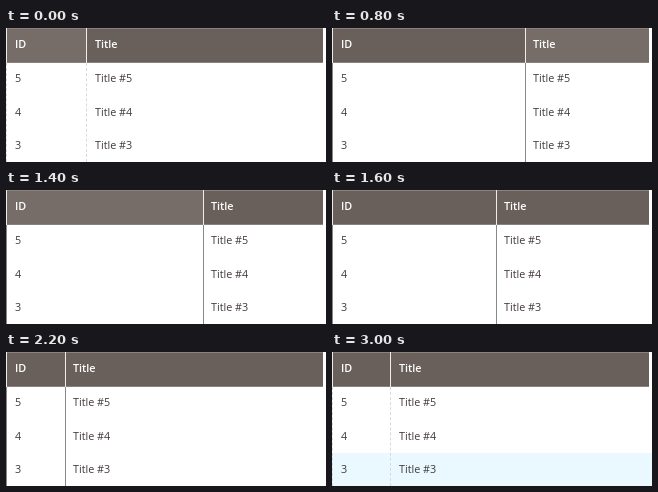
An HTML page that plays this animation: 320x134 px, repeating every 3.1 s.

```html
<!DOCTYPE html>
<html lang="en">
<head>
<meta charset="utf-8">
<title>Resizable column</title>
<style>
html, body { margin: 0; width: 100%; height: 100%; overflow: hidden; background: #fff; }
#grid {
  --x: 80px;
  --line: var(--x);
  position: relative; width: 320px; height: 134px; overflow: hidden;
  font: 10.8px/31px "Open Sans", sans-serif; color: #41393a;
}
#grid.drag { --line: calc(var(--x) + 1px); }
#grid div { position: absolute; white-space: pre; }
#grid .head {
  top: 0; height: 35px; box-sizing: border-box;
  background: #69605c; border: solid #8a827f; border-width: 1px 0;
}
#grid .hover { background: #766d69; }
#headId { left: 1px; width: calc(var(--line) - 1px); }
#headTitle { left: calc(var(--line) + 1px); right: 3px; }
.row { left: 0; width: 320px; height: 33.5px; }
.row.hot { background: #e9f9ff; }
.label { color: #fff; font-weight: 600; }
.id { left: 9px; }
.title { left: calc(var(--x) + 9px); }
.tick { top: 0; width: 1px; height: 35px; background: #efedec; }
.rule { top: 35px; height: 99px; border-left: 1px dashed #d9d9d9; }
.drag .rule { border-left: 1px solid #85898c; }
.mid { left: var(--line); }
.edge { left: 0; }
</style>
</head>
<body>
<div id="grid">
  <div class="head" id="headId"></div>
  <div class="head" id="headTitle"></div>
  <div class="label id">ID</div>
  <div class="label title">Title</div>
</div>
<script>
const LOOP = 3100, STEP = 100;
// Divider position over time: [ms, px]
const path = [
  [0, 80], [200, 80], [300, 82], [400, 92], [500, 111], [600, 143], [700, 175],
  [800, 192], [900, 196], [1400, 196], [1500, 188], [1600, 163], [1700, 134],
  [1800, 107], [1900, 86], [2000, 71], [2100, 62], [2200, 58], [LOOP, 58]
];
const grid = document.getElementById('grid');
const headId = document.getElementById('headId');
const headTitle = document.getElementById('headTitle');

function add(parent, cls, text = '') {
  const el = document.createElement('div');
  el.className = cls;
  el.textContent = text;
  return parent.appendChild(el);
}

const rows = [5, 4, 3].map((n, i) => {
  const row = add(grid, 'row');
  row.style.top = 34 + i * 33.5 + 'px';
  add(row, 'id', n);
  add(row, 'title', 'Title #' + n);
  return row;
});
for (const side of ['edge', 'mid']) {
  add(grid, 'tick ' + side);
  add(grid, 'rule ' + side);
}

function dividerAt(t) {
  const i = path.findIndex(p => p[0] > t);
  const [t0, x0] = path[i - 1], [t1, x1] = path[i];
  return Math.round(x0 + (x1 - x0) * (t - t0) / (t1 - t0));
}

const start = performance.now();
function draw(now) {
  const t = Math.floor(Math.max(0, now - start) % LOOP / STEP) * STEP;
  const during = (a, b) => t >= a && t < b;
  grid.style.setProperty('--x', dividerAt(t) + 'px');
  grid.classList.toggle('drag', during(300, 2400));
  headId.classList.toggle('hover', during(0, 600) || during(1000, 1500));
  headTitle.classList.toggle('hover', during(600, 1000));
  rows[2].classList.toggle('hot', during(2800, LOOP));
  requestAnimationFrame(draw);
}
draw(start);
</script>
</body>
</html>
```
